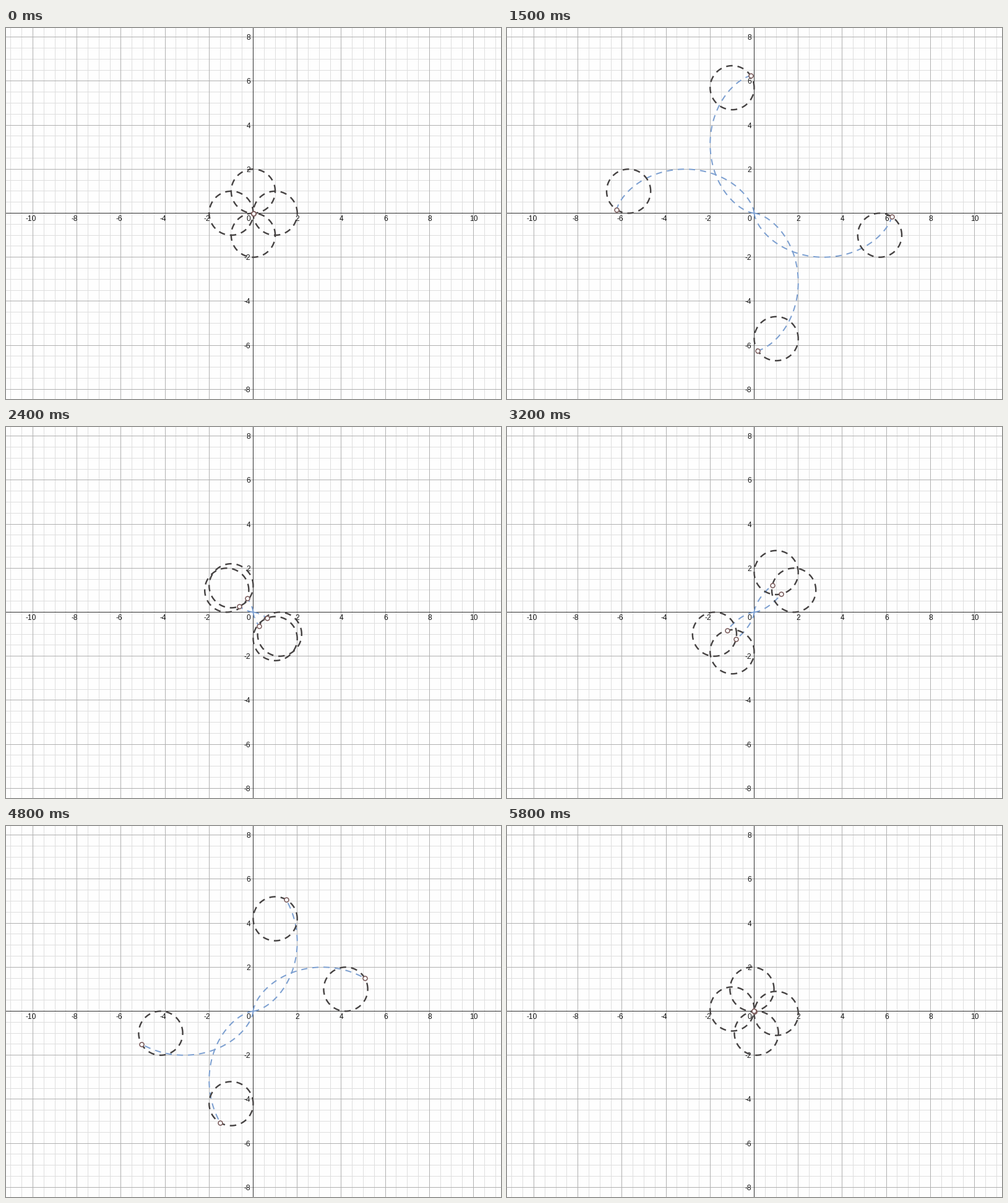
Write a matplotlib script that moves like this. It is 800 by 600 pixels and loops after 5900 ms.

```python
import numpy as np
import matplotlib.pyplot as plt
from matplotlib.animation import FuncAnimation

W, H, DPI = 800, 600, 100
CX, CY, UNIT = 399.5, 299.5, 35.6
FRAMES, INTERVAL = 59, 100
PX = 72 / DPI  # points per pixel

INK, BLUE, RIM = "#454242", "#7c9fd0", "#7d5f5f"

# Unfolded slider travel over time; the pace is slightly uneven
BEATS = [0, 15, 24, 32, 40, 48, 58]
TRAVEL = [0, 6.87, 11.37, 14.37, 17.87, 20.93, 25.23]

fig = plt.figure(figsize=(W / DPI, H / DPI), dpi=DPI, facecolor="#fefefe")
ax = fig.add_axes([0, 0, 1, 1])
ax.set_xlim(0, W)
ax.set_ylim(H, 0)
ax.axis("off")


def sx(x):
    return CX + UNIT * np.asarray(x)


def sy(y):
    return CY - UNIT * np.asarray(y)


def pixel(v):
    return np.floor(v) + 0.5


def rule(x, y, color, z):
    """Crisp one-pixel grid lines through (x, y)."""
    style = dict(color=color, lw=PX, zorder=z, snap=False)
    ax.axvline(pixel(sx(x)), **style)
    ax.axhline(pixel(sy(y)), **style)


def label(x, y, text, ha):
    ax.text(x, y, text, ha=ha, va="baseline", color="#151515", zorder=3,
            family="Liberation Sans", fontsize=12 * PX)


def draw_grid():
    for k in range(-23, 24):
        if k % 4:
            rule(k / 2, k / 2, "#dedede", 0)
    for k in range(-10, 11, 2):
        if k:
            rule(k, k, "#b0b0b0", 1)
            shift = 0.5 if k > 0 else -3.5
            label(sx(k) + shift, 312.3, str(k), "center")
            if abs(k) <= 8:
                label(395, sy(k) + 4.5, str(k), "right")
    rule(0, 0, "#303030", 2)
    label(395, 312.3, "0", "right")


def dashed(color, width, z):
    """Long dashes that grow with the line width, 8 px apart."""
    pattern = (0, ((8 + width) / width, 8 / width))
    return ax.plot([], [], color=color, lw=width * PX, zorder=z,
                   linestyle=pattern, snap=False)[0]


def slider(i):
    s = np.interp(i, BEATS, TRAVEL)
    turn = 2 * np.pi
    a = turn - abs((s - turn) % (4 * turn) - 2 * turn)
    return np.clip(round(a, 1), -turn, turn)


def variants(x, y):
    """Four symmetric copies of a curve."""
    return (x, y), (-x, -y), (y, x), (-y, -x)


draw_grid()
trails = [dashed(BLUE, 2, 4) for _ in range(4)]
wheels = [dashed(INK, 2.4, 5) for _ in range(4)]
pens = [ax.plot([], [], "o", ms=7 * PX, mfc="#fefefe", mec=RIM,
                mew=1.6 * PX, zorder=6)[0] for _ in range(4)]
theta = np.linspace(0, 2 * np.pi, 121)


def update(i):
    a = slider(i)
    t = np.linspace(0, a, 160)
    paths = variants(t - np.sin(t), 1 - np.cos(t))
    hubs = variants(a, 1)
    for trail, wheel, pen, (x, y), (hx, hy) in zip(
            trails, wheels, pens, paths, hubs):
        trail.set_data(sx(x), sy(y))
        wheel.set_data(sx(hx + np.cos(theta)), sy(hy + np.sin(theta)))
        pen.set_data([sx(x[-1])], [sy(y[-1])])
    return trails + wheels + pens


anim = FuncAnimation(fig, update, frames=FRAMES, interval=INTERVAL,
                     repeat=True, repeat_delay=0, blit=False)
plt.show()
```
